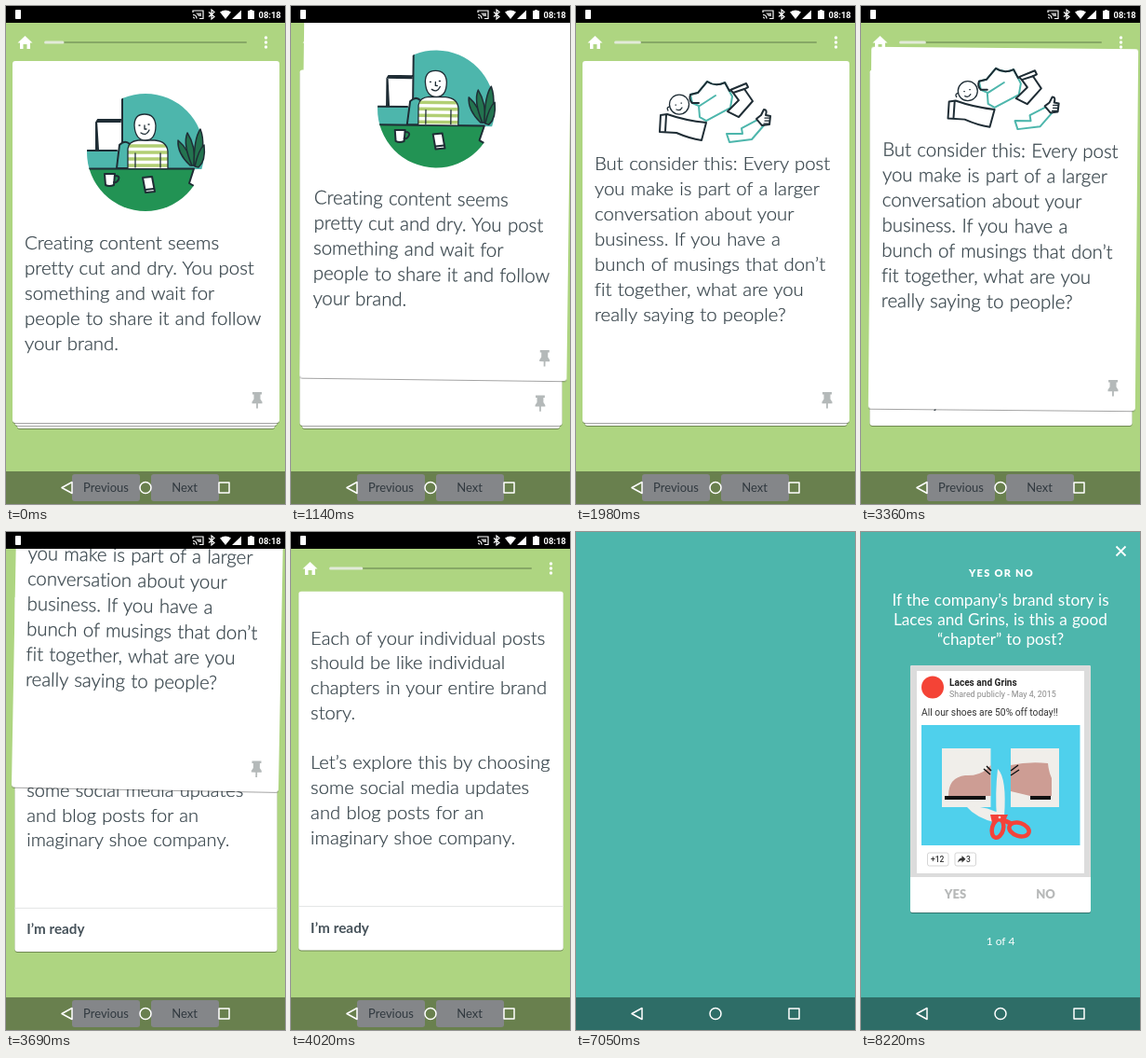
Animation, 300 px wide and 534 px high, one loop 8.34 s. Source, as an HTML page:

```html
<!DOCTYPE html>
<html lang="en">
<head>
<meta charset="utf-8">
<title>Lesson cards</title>
<style>
  html, body { margin: 0; width: 100%; height: 100%; overflow: hidden; background: #aed581; }
  svg { display: block; width: 100%; height: 100%; }
  text { font-family: Lato, sans-serif; font-variant-ligatures: none; }
  .copy { font-size: 20.4px; font-weight: 300; word-spacing: .8px; fill: #36434a; stroke: #36434a; stroke-width: .25px; }
  .question { font-size: 17.2px; word-spacing: .8px; }
  .ui { font-family: Roboto, sans-serif; }
  .mid { text-anchor: middle; }
  .sheet { fill: #fff; filter: drop-shadow(0 1px .7px rgba(0, 0, 0, .36)); }
  .ink { fill: none; stroke: #1f2d35; stroke-width: 2; stroke-linejoin: round; stroke-linecap: round; }
  .mint { stroke: #4db6ac; }
  .thin { stroke-width: 1.3; }
  .paper { fill: #fff; }
</style>
</head>
<body>
<svg viewBox="0 0 300 534">
  <defs>
    <clipPath id="disc"><circle cx="150" cy="157" r="63"/></clipPath>
    <clipPath id="shirt"><path d="M131 174V153Q132 145 142 144H160Q173 145 174 156V174Z"/></clipPath>
    <rect id="sheet" class="sheet" x="7" y="59" width="287" height="388" rx="3"/>
    <path id="pin" fill="#b4b9b9" d="M265 414h10v2.500h-1.500v5l2 3v1.700h-4.600v5.300h-1.800v-5.300h-4.600v-1.700l2-3v-5H265Z"/>
  </defs>

  <rect width="300" height="534" fill="#aed581"/>

  <!-- toolbar -->
  <path fill="#fff" d="M20.500 32 28.500 39.500H26V46H22.500V41H18.500V46H15V39.500H12.500Z"/>
  <rect x="41" y="38" width="218" height="2" rx="1" fill="#87a866"/>
  <rect id="progress" x="41" y="37.400" height="3.200" rx="1.500" fill="#e2ead9"/>
  <g fill="#fff"><circle cx="279.500" cy="34" r="1.700"/><circle cx="279.500" cy="39" r="1.700"/><circle cx="279.500" cy="44" r="1.700"/></g>

  <!-- bottom buttons, dimmed by the navigation bar -->
  <g fill="#dcdfe4"><rect x="71" y="502" width="73" height="29" rx="3"/><rect x="156" y="502" width="73" height="29" rx="3"/></g>
  <g class="mid" font-size="13" fill="#4f5d68"><text x="107.500" y="521">Previous</text><text x="192" y="521">Next</text></g>

  <g id="card3">
    <use href="#sheet"/>
    <text class="copy" y="116.300">
      <tspan x="20">Each of your individual posts</tspan><tspan x="20" dy="27">should be like individual</tspan><tspan x="20" dy="27">chapters in your entire brand</tspan><tspan x="20" dy="27">story.</tspan><tspan x="20" dy="54">Let’s explore this by choosing</tspan><tspan x="20" dy="27">some social media updates</tspan><tspan x="20" dy="27">and blog posts for an</tspan><tspan x="20" dy="27">imaginary shoe company.</tspan>
    </text>
    <path stroke="#e2e4e4" d="M7 399.500H294"/>
    <text x="20" y="428" font-size="15.500" font-weight="700" fill="#46525a">I’m ready</text>
  </g>

  <g id="card2">
    <use href="#sheet"/>
    <g class="ink">
      <path d="M91 117 98 116Q118 123 140 125L135 144Q122 142 108 136L90 135Z"/>
      <path d="M97 117 96 134"/>
      <circle class="paper thin" cx="111" cy="105.500" r="10.500"/>
      <path class="thin" d="M108 111q4 2 6-2M107 106h.5M113 104h.5M100 108q-3 1-1 4"/>
      <path class="paper mint" d="M123 95 131 93 141 81Q150 87 160 82L168 97 166 109 140 123 133 119 132 107 125 104Z"/>
      <path d="M132 104 125 104Q121 100 123 95L131 93 141 81Q150 87 160 82L165 91"/>
      <path class="mint" d="M133 107 150 96"/>
      <path class="paper" d="M166 90 183 83 185 87 181 89 190 102 175 119 163 113 175 101 169 93Z"/>
      <path d="M169 93 181 89"/>
      <path class="paper mint" d="M162 137 179 137 178 131 195 122 202 128 189 143 165 146Z"/>
      <path class="paper" d="M194 121 199 117 202 111Q206 111 204 117L209 118 208 127 200 128Z"/>
      <path class="thin" d="M203 120h5M203 123h5M202 126h5"/>
    </g>
    <text class="copy" y="176">
      <tspan x="20">But consider this: Every post</tspan><tspan x="20" dy="27">you make is part of a larger</tspan><tspan x="20" dy="27">conversation about your</tspan><tspan x="20" dy="27">business. If you have a</tspan><tspan x="20" dy="27">bunch of musings that don’t</tspan><tspan x="20" dy="27">fit together, what are you</tspan><tspan x="20" dy="27">really saying to people?</tspan>
    </text>
    <use href="#pin"/>
  </g>

  <g id="card1">
    <use href="#sheet"/>
    <g clip-path="url(#disc)">
      <path fill="#4db6ac" d="M125 90H214V175H87V155H125Z"/>
      <path fill="#229354" d="M80 174H202L197 190 204 194V222H80Z"/>
      <path class="ink" d="M125 94V154M86 155H119M97 155V122H124M97 122 99 154M95 124H123M86 174.500H202L197 190 204 194"/>
      <path class="ink" style="fill:#4db6ac" d="M119 174 122 149Q128 143 133 148V174Z"/>
    </g>
    <g clip-path="url(#shirt)">
      <rect x="130" y="143" width="45" height="32" fill="#fff"/>
      <path stroke="#b2cf74" stroke-width="3.600" d="M130 150H175M130 157H175M130 164H175M130 171H175"/>
    </g>
    <path class="ink thin" d="M131 174V153Q132 145 142 144H160Q173 145 174 156V174M139 158V173M166 158V173"/>
    <path class="ink thin paper" d="M138 128Q138 116 149 116T161 128Q161 144 150 144T138 128Z"/>
    <path class="ink thin" d="M143 128h1M153 127h1M149 128v4h2M145 136q6 4 9-3"/>
    <g fill="#23734f" stroke="#1f2d35" stroke-width="1.500" stroke-linejoin="round">
      <path d="M198 171Q184 158 185 144 197 154 200 171Z"/>
      <path d="M200 171Q190 148 195 136 204 150 203 171Z"/>
      <path d="M202 171Q202 142 209 132 216 151 205 171Z"/>
      <path d="M203 172Q207 154 213 149 215 166 207 173Z"/>
    </g>
    <path class="ink paper" d="M106 180H117L116 192Q111 194 107 192Z"/>
    <path class="ink" d="M117 182q6 0 4 4t-5 3"/>
    <path class="ink paper" d="M147 184 157 183 160 199 150 200Z"/>
    <path class="ink" d="M150 197 159 196"/>
    <text class="copy" y="260.500">
      <tspan x="20">Creating content seems</tspan><tspan x="20" dy="27">pretty cut and dry. You post</tspan><tspan x="20" dy="27">something and wait for</tspan><tspan x="20" dy="27">people to share it and follow</tspan><tspan x="20" dy="27">your brand.</tspan>
    </text>
    <use href="#pin"/>
  </g>

  <g id="fab">
    <circle r="20.500" fill="#4db6ac" style="filter:drop-shadow(0 2px 2px rgba(0,0,0,.35))"/>
    <path fill="none" stroke="#fff" stroke-width="2.400" d="M-3-5.500 2.500 0-3 5.500"/>
  </g>
  <circle id="reveal" cx="260" cy="400" fill="#4db6ac"/>

  <g id="quiz">
    <path stroke="#fff" stroke-width="1.800" d="M274.500 15.500 284.500 25.500M284.500 15.500 274.500 25.500"/>
    <g class="mid" fill="#fff">
      <text x="151" y="47.500" font-size="11" font-weight="900" letter-spacing="1.300">YES OR NO</text>
      <text class="question" y="78.500"><tspan x="150">If the company’s brand story is</tspan><tspan x="150" dy="21.200">Laces and Grins, is this a good</tspan><tspan x="150" dy="21.200">“chapter” to post?</tspan></text>
      <text x="150" y="442.500" font-size="12">1 of 4</text>
    </g>
    <rect class="sheet" x="53" y="143" width="194" height="265" rx="2"/>
    <path fill="#dcdcdc" d="M53 370V145q0-2 2-2H245q2 0 2 2V370Z"/>
    <rect x="60" y="149" width="180" height="217" fill="#fff"/>
    <circle cx="77" cy="166.500" r="12" fill="#f44336"/>
    <text class="ui" x="95" y="164.500" font-size="10.100" font-weight="700" fill="#222">Laces and Grins</text>
    <text class="ui" x="95" y="177" font-size="8.900" fill="#8a8a8a">Shared publicly - May 4, 2015</text>
    <text class="ui" x="65" y="197" font-size="10.300" fill="#333">All our shoes are 50% off today!!</text>
    <rect x="65" y="207" width="170.500" height="129" fill="#4fd0ec"/>
    <path fill="#f0eeea" d="M87 232H139.500V295H87ZM161 232H213V295H161Z"/>
    <path fill="#cd9d94" d="M94 283Q94 263 112 261 130 262 139.500 250V283ZM161 250Q180 246 201 248 202 258 205 264V283H182L161 278Z"/>
    <path stroke="#111" stroke-width="4" d="M90 285H134M182 285H204"/>
    <path stroke="#111" stroke-width="1.500" d="M132 254 139 260M135 251 140 256M161 256 169 250M161 261 170 255"/>
    <path fill="#f0eeea" d="M147 254Q157 264 154 305L146 307Q144 280 147 254ZM113 294Q136 293 152 304L146 312Q124 307 113 294Z"/>
    <path fill="#f4433a" d="M139 303 158 303 153 314 141 312Z"/>
    <g fill="#4fd0ec" stroke="#f4433a" stroke-width="4.500"><ellipse cx="147" cy="318" rx="6" ry="10" transform="rotate(15 147 318)"/><ellipse cx="170" cy="319" rx="11" ry="7" transform="rotate(18 170 319)"/></g>
    <path stroke="#f4433a" stroke-width="5" d="M145 305 162 313"/>
    <circle cx="149" cy="306" r="1.300" fill="#f0eeea"/>
    <g fill="#fff" stroke="#d5d5d5"><rect x="71.500" y="344" width="22.500" height="14" rx="2"/><rect x="101" y="344" width="22.500" height="14" rx="2"/></g>
    <g font-size="8.500" font-weight="500" fill="#333"><text class="ui" x="75" y="354">+12</text><text class="ui" x="113" y="354">3</text></g>
    <path fill="#333" d="M104 354.500Q105 349.500 108.500 349.500V347L112.500 350.800 108.500 354.500V352.200Q106 352 104 354.500Z"/>
    <g class="mid" font-size="13" font-weight="900" fill="#b7b9b9"><text x="101.500" y="393">YES</text><text x="198.500" y="393">NO</text></g>
  </g>

  <!-- system bars -->
  <rect y="499" width="300" height="35" opacity=".4"/>
  <g fill="none" stroke="#fff" stroke-width="1.500" stroke-linejoin="round">
    <path d="M71 510.500V522.500L60 516.500Z"/><circle cx="150" cy="516.500" r="6"/><rect x="229" y="511" width="11" height="11"/>
  </g>
  <g id="status">
    <rect width="300" height="18"/>
    <g fill="#fff">
      <rect x="10" y="4" width="6" height="10" rx=".8"/>
      <path d="M230 6.500Q236 2.500 242 6.500L236 14ZM243 14 253 4.500V14ZM260 5H262V4H265V5H267V14H260Z"/>
      <text class="ui" x="271.500" y="12.700" font-size="9.400" font-weight="700">08:18</text>
      <path opacity=".7" d="M204 7.500H210V11H207Z"/>
    </g>
    <path fill="none" stroke="#fff" stroke-width="1.200" d="M201 7V5H212V13.500H208M201 9.500q4 0 4 4M201 12q1.500 0 1.500 1.500M218 6.500 224 11.500 221 14V4L224 6.500 218 11.500"/>
  </g>
</svg>

<script>
const LOOP = 8340;
const part = id => document.getElementById(id);
const [card1, card2, card3, fab, reveal, quiz, statusBar, progress] =
  ['card1', 'card2', 'card3', 'fab', 'reveal', 'quiz', 'status', 'progress'].map(part);

const clamp = x => Math.min(1, Math.max(0, x));
const span = (t, from, to) => clamp((t - from) / (to - from));
const smooth = x => x * x * (3 - 2 * x);
const easeOut = x => 1 - (1 - x) ** 3;
const backOut = x => 1 + 2.2 * (x - 1) ** 3 + 1.2 * (x - 1) ** 2;
const settle = (t, from) => t < from ? 0 : 1 - Math.exp((from - t) / 125);
const show = (el, on) => el.setAttribute('visibility', on ? 'visible' : 'hidden');
const move = (el, value) => el.setAttribute('transform', value);

const swipes = [
  { start: 1080, end: 1395, release: 1260, dx: 32, turn: 3 },
  { start: 3360, end: 4000, release: 3934, dx: 0, turn: 1.6 },
];

// Depth 0 is the front card; deeper cards are smaller and peek out below.
function stack(card, depth) {
  move(card, `translate(150.5 ${447 + 3 * depth}) scale(${1 - .017 * depth}) translate(-150.5 -447)`);
}

function swipe(card, t, { start, end, dx, turn }) {
  const u = span(t, start, end) ** 1.6;
  move(card, `translate(${2.5 + dx * u} ${-14 - 450 * u}) rotate(${.5 + turn * u} 150 253)`);
}

function draw(t) {
  const [first, second] = swipes;
  const p1 = settle(t, first.release), p2 = settle(t, second.release);

  t < first.start ? stack(card1, 0) : swipe(card1, t, first);
  t < second.start ? stack(card2, 1 - p1) : swipe(card2, t, second);
  stack(card3, 2 - p1 - p2);
  show(card1, t < first.end);
  show(card2, t < second.end);
  progress.setAttribute('width', 21.5 + 7.4 * (clamp(2 * p1) + clamp(2 * p2)));

  move(fab, `translate(259.5 400) scale(${t < 4200 ? 0 : backOut(span(t, 4200, 4500))})`);
  show(fab, t >= 4200);
  show(reveal, t > 5910);
  reveal.setAttribute('r', 20 + 465 * smooth(span(t, 5910, 6330)));

  move(statusBar, `translate(0 ${-18 * smooth(span(t, 6690, 7020))})`);
  const enter = easeOut(span(t, 7080, 7380));
  quiz.setAttribute('opacity', enter);
  move(quiz, `translate(0 ${30 * (1 - enter)})`);
}

const began = performance.now();
function frame() {
  draw((performance.now() - began) % LOOP);
  requestAnimationFrame(frame);
}
frame();
</script>
</body>
</html>
```
